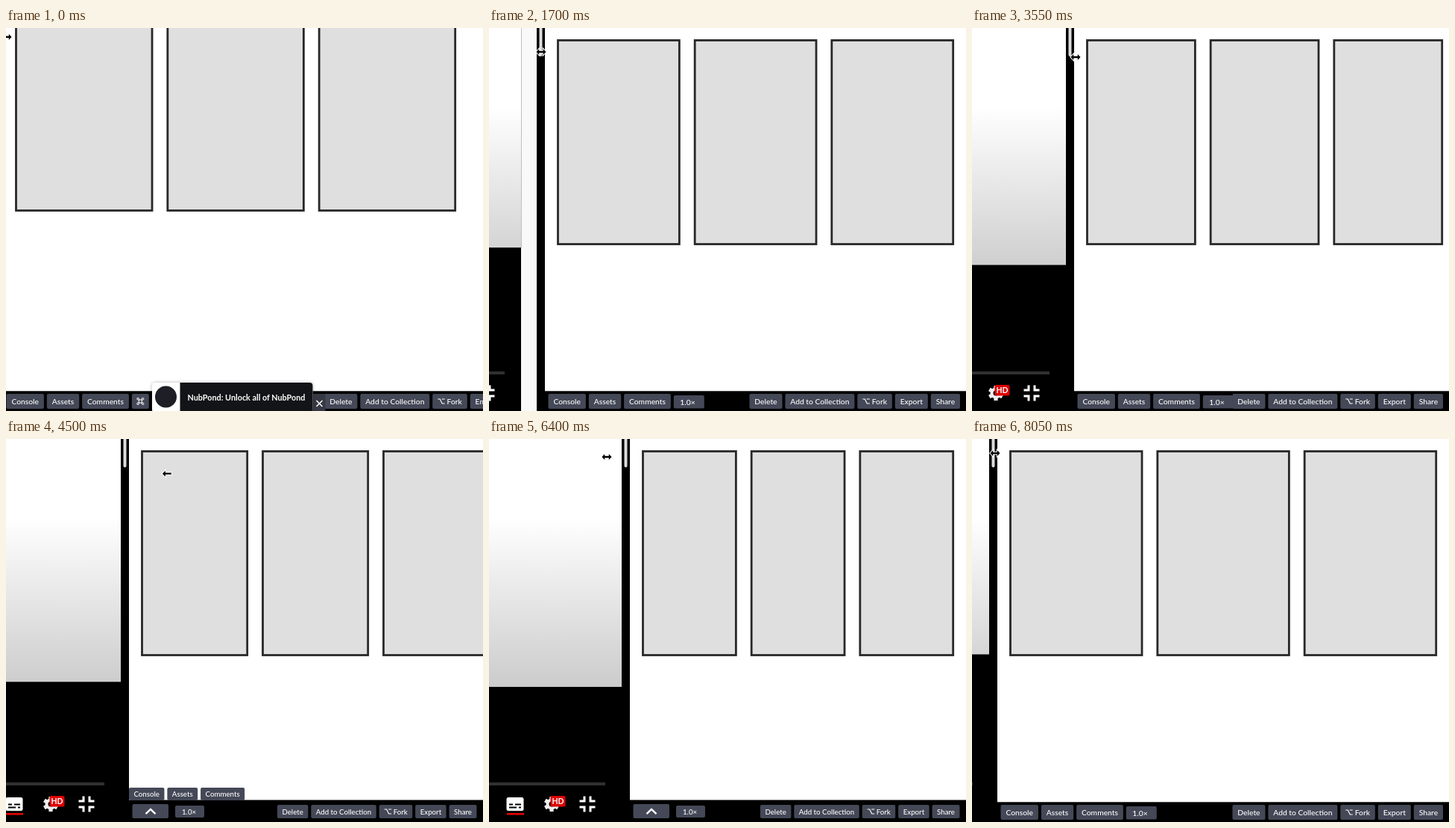
Recreate the animation shown at these times as an HTML page. Size 640 by 513 pixels, loop 8100 ms.

```html
<!DOCTYPE html>
<html lang="en">
<head>
<meta charset="utf-8">
<title>Resizable panes</title>
<style>
html, body { margin: 0; width: 100%; height: 100%; overflow: hidden; background: #fff; }
svg { display: block; width: 640px; height: 513px; }
text { font-family: Lato, sans-serif; font-weight: 500; fill: #fff; }
</style>
</head>
<body>
<svg viewBox="0 0 640 513" xmlns="http://www.w3.org/2000/svg">
  <defs>
    <linearGradient id="fade" gradientUnits="userSpaceOnUse" x1="0" y1="105" x2="0" y2="335">
      <stop offset="0" stop-color="#fff"/>
      <stop offset="1" stop-color="#cbcbcb"/>
    </linearGradient>
    <filter id="soft" x="-10%" y="-30%" width="120%" height="160%">
      <feDropShadow dx="0" dy="0" stdDeviation="2" flood-opacity=".3"/>
    </filter>
  </defs>
  <g id="scene"></g>
</svg>
<script>
const LOOP = 8100, STEP = 50, BAR = 11, LAG = 237, GAP = 3.9;
const scene = document.getElementById('scene');
const pen = document.createElement('canvas').getContext('2d');

// Drags: start time, end time, destination
const EDGE_DRAGS = [[0, 850, 40], [850, 1250, 54], [1470, 1700, 75], [2945, 3150, 129],
  [3400, 3650, 140], [4290, 4840, 189], [6400, 7550, 34]];
const POINTER_DRAGS = [[0, 1700, 70, 32], [2700, 3080, 139, 39], [4300, 4540, 222, 47],
  [5600, 6400, 158, 24], [6400, 7350, 31, 19]];
// Times at which the cards adapt to the pane width
const REFLOWS = [0, 850, 1250, 1700, 3300, 3650, 4850, 7700];

const progress = (t, a, b) => Math.min(1, Math.max(0, (t - a) / (b - a)));
const smooth = k => k * k * (3 - 2 * k);
const glide = k => 1 - (1 - k) ** 1.45;
const follow = (drags, t, from, i = 2) =>
  drags.reduce((p, d) => p + (d[i] - p) * glide(progress(t, d[0], d[1])), from);
const edge = t => Math.round(follow(EDGE_DRAGS, t, -4));

// The video trails the edge in the first and last drags
const videoRight = t => edge(t < 2050 || t > 6400 ? t - LAG : t) - BAR;
const layoutWidth = t => Math.min(624, 640 - edge(REFLOWS.filter(r => r <= t).pop()));

const rect = (x, y, w, h, fill, more = '') =>
  `<rect x="${x}" y="${y}" width="${Math.max(0, w)}" height="${h}" fill="${fill}" ${more}/>`;
const label = (s, x, y, size, more = '') =>
  `<text x="${x}" y="${y}" font-size="${size}" ${more}>${s}</text>`;
const bold = 'text-anchor="middle" style="font-weight:700"';
const line = (d, w, color = '#fff') =>
  `<path d="${d}" fill="none" stroke="${color}" stroke-width="${w}"/>`;
const at = (x, y, body) => `<g transform="translate(${x} ${y})">${body}</g>`;
const box = (x, y, w, h) => rect(x, y, w, h, '#444857', 'rx="2"');

const ICON = 12.5;
const iconSpace = s => s === 'Fork' ? ICON : 0;
const pad = size => size * 0.67;

function buttonWidth(s, size) {
  pen.font = `500 ${size}px Lato, sans-serif`;
  return pen.measureText(s).width + 2 * pad(size) + iconSpace(s);
}

const rowWidth = (names, size) =>
  names.reduce((sum, s) => sum + buttonWidth(s, size) + GAP, -GAP);

function row(names, x, y, h, size) {
  return names.map(s => {
    const w = buttonWidth(s, size), left = x, mid = y + h / 2;
    x += w + GAP;
    return box(left, y, w, h) +
      (iconSpace(s) && at(left + 7, mid - 3, line('M0 0H3L6 6H9.5M5.5 0H9.5', 1.2)) || '') +
      label(s, left + pad(size) + iconSpace(s), mid + 3.7, size);
  }).join('');
}

function video(v) {
  if (v <= 0) return '';
  const h = 282 + v * 0.281;
  const teeth = [0, 1, 2, 3, 4, 5].map(i =>
    rect(-2.6, -10, 5.2, 6, '#eee', `transform="rotate(${i * 60})"`)).join('');
  const corners = [0, 1, 2, 3].map(i =>
    `<g transform="rotate(${i * 90})">${line('M4 -10.5V-4H10.5', 3)}</g>`).join('');
  return rect(0, 0, v, 513, '#000') +
    rect(0, 0, v, h, 'url(#fade)') +
    rect(v, 0, 0.7, h, '#aaa') +
    rect(0, 460, v - 22, 4, '#303030') +
    at(v - 143, 489,
      rect(-11.5, -9, 23, 18, '#fff', 'rx="2.5"') +
      line('M-8 0.5H-3M0 0.5H8M-8 4.5H2M5 4.5H8', 2, '#000') +
      rect(-11, 12, 23, 2.5, '#e00')) +
    at(v - 94, 489, teeth + '<circle r="5.5" fill="none" stroke="#eee" stroke-width="4"/>') +
    rect(v - 95.5, 478, 20, 14.5, '#d00', 'rx="2"') +
    label('HD', v - 85.5, 489.2, 10.5, bold) +
    at(v - 46, 489, corners);
}

function cards(x, y, width) {
  const w = (width - 68) / 3;
  return [0, 1, 2].map(i =>
    rect(x + 17.5 + i * (w + 18), y + 1.5, w - 2.8, 273, '#dfdfdf',
      'stroke="#282828" stroke-width="2.8"')).join('');
}

const TABS = ['Console', 'Assets', 'Comments'];
const ACTIONS = ['Delete', 'Add to Collection', 'Fork', 'Export', 'Share'];
const MORE_ACTIONS = ['Delete', 'Add to Collection', 'Fork', 'Embed', 'Export', 'Share'];

function smallToolbar(t, x) {
  const size = 9.7;
  return rect(x, 483.5, 640 - x, 29.5, '#000') +
    (t < 4600 ? row(TABS, x, 467, 17, size) : '') +
    box(x + 4.5, 489, 48.5, 19) +
    at(x + 29, 499, line('M-6.5 3.2L0 -3L6.5 3.2', 2.4)) +
    box(x + 62, 491, 39, 16) + label('1.0×', x + 71, 502.5, size) +
    row(ACTIONS, 631.5 - rowWidth(ACTIONS, size), 490, 18, size);
}

function toolbar(t, x) {
  const size = 10.3, wide = t < 850;
  const actions = wide ? MORE_ACTIONS : ACTIONS;
  const right = wide ? 759 - 78 * smooth(progress(t, 0, 850)) : 632;
  const next = x + 4.5 + rowWidth(TABS, size) + GAP;
  const zoom = next + (wide ? 27 : 0);
  const loop = [0, 1, 2, 3].map(i =>
    `<g transform="rotate(${i * 90})">${line('M-2 -2H2V-3A1.3 1.3 0 1 1 3 -2H2', 1)}</g>`).join('');
  return rect(x, 486.3, 640 - x, 26.7, '#000') +
    row(TABS, x + 4.5, 490, 20, size) +
    (wide ? box(next, 490, 23, 20) + at(next + 11.5, 500, loop) : '') +
    box(zoom, 492, 41, 17.5) + label('1.0×', zoom + 8.5, 504.5, size) +
    row(actions, right - rowWidth(actions, size), 490, 20, size);
}

function toast(t) {
  const k = progress(t, 0, 400);
  if (k === 1) return '';
  return at(0, 45 * smooth(k),
    rect(412, 490, 16.5, 23, '#363944') +
    at(420.5, 503, line('M-4 -4L4 4M4 -4L-4 4', 1.5)) +
    rect(196, 475, 215.5, 40, '#fff', 'rx="4" filter="url(#soft)"') +
    '<path d="M233.5 475H407.5a4 4 0 0 1 4 4V515H233.5Z" fill="#131417"/>' +
    '<circle cx="214.5" cy="494" r="14.5" fill="#1e1f26"/>' +
    label('NubPond: Unlock all of NubPond', 322.5, 498.7, 10.8, bold));
}

function pointer(t) {
  const shape = t >= 4400 && t < 5600
    ? 'M-6 0L-2 -4V-1.2H6V1.2H-2V4Z'
    : 'M-6.5 0L-2.8 -4V-1.2H2.8V-4L6.5 0L2.8 4V1.2H-2.8V4Z';
  return at(follow(POINTER_DRAGS, t, 1), follow(POINTER_DRAGS, t, 12, 3),
    `<path d="${shape}" fill="#000" stroke="#fff" stroke-width="2" paint-order="stroke"/>`);
}

function draw(t) {
  const x = edge(t);
  const small = t >= 4400 && x > 138;
  scene.innerHTML =
    rect(0, 0, 640, 513, '#f9f9f9') +
    video(videoRight(t)) +
    rect(x, 0, 640 - x, 513, '#fff') +
    cards(x, 15 - 45 * (1 - smooth(progress(t, 0, 850))), layoutWidth(t)) +
    (small ? smallToolbar : toolbar)(t, x) +
    rect(x - BAR, 0, BAR, 513, '#000') +
    rect(x - 7.5, -4, 4, 42, '#ddd', 'rx="2"') +
    toast(t) + pointer(t);
}

const start = performance.now();
function tick() {
  const t = (performance.now() - start) % LOOP;
  draw(Math.floor(t / STEP) * STEP);
  requestAnimationFrame(tick);
}
draw(0);
requestAnimationFrame(tick);
</script>
</body>
</html>
```
